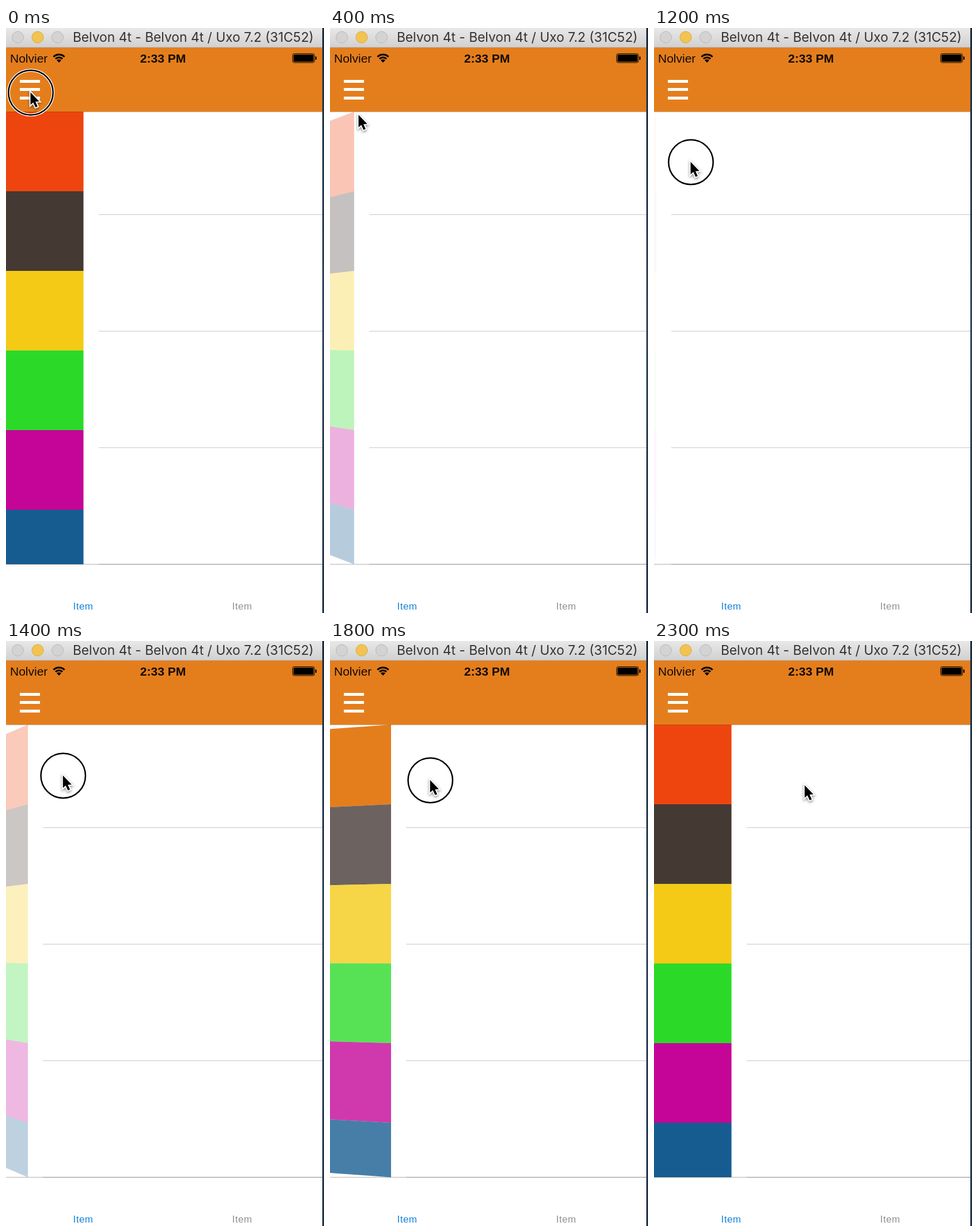
Animation of 552x1014 px, one loop 2400 ms. Source, as an HTML page with a canvas:

```html
<!DOCTYPE html>
<html lang="en">
<head>
<meta charset="utf-8">
<title>Folding drawer</title>
<style>
html, body { margin: 0; width: 100%; height: 100%; overflow: hidden; background: #fff }
canvas { display: block }
</style>
</head>
<body>
<canvas id="stage" width="552" height="1014"></canvas>
<script>
const c = document.getElementById('stage').getContext('2d');
const LOOP = 2400, STEP = 100;
const OPEN = 134.5, TOP = 145, BOTTOM = 929.5, BAND = 138, DEPTH = 1850;
const NAV = '#e47e1d';
const BANDS = ['#ee450f', '#453934', '#f4ca16', '#2bda29', '#c40597', '#165c91'];
const UI = '"Liberation Sans", Arial, sans-serif';

// Pointer path: time, x, y
const PATH = [
  [0, 43, 112], [100, 43, 112], [300, 52, 124], [500, 48, 178], [700, 41, 225],
  [1000, 45, 232], [1200, 64, 232.5], [1600, 134.5, 234.5], [1800, 174.2, 241.5],
  [2000, 222, 247], [2200, 257, 250], [2300, 262, 250.5], [2400, 262, 250.5]
];

function pointerAt(t) {
  const i = PATH.findIndex(p => p[0] > t);
  const [t0, x0, y0] = PATH[i - 1], [t1, x1, y1] = PATH[i];
  const k = (t - t0) / (t1 - t0);
  return [x0 + (x1 - x0) * k, y0 + (y1 - y0) * k];
}

// What remains of a unit step after s seconds of a damped spring
function spring(s) {
  if (s <= 0) return 1;
  const w = 8.95, z = 0.77, q = Math.sqrt(1 - z * z), a = w * q * s;
  return Math.exp(-z * w * s) * (Math.cos(a) + z / q * Math.sin(a));
}

// Springs shut after the tap, then is dragged open at a steady speed
function drawerWidth(t) {
  if (t < 1100) return OPEN * spring((t - 177) / 1000);
  return Math.max(0, Math.min(OPEN, 4 + 0.17 * (t - 1200)));
}

function rect(x, y, w, h, fill) {
  c.fillStyle = fill;
  c.fillRect(x, y, w, h);
}

function poly(points, fill) {
  c.beginPath();
  points.forEach(p => c.lineTo(...p));
  c.closePath();
  c.fillStyle = fill;
  c.fill();
}

function circle(x, y, r, stroke, width, fill) {
  c.beginPath();
  c.arc(x, y, r, 0, 7);
  if (fill) { c.fillStyle = fill; c.fill(); }
  c.strokeStyle = stroke;
  c.lineWidth = width;
  c.stroke();
}

function text(s, x, y, font, fill, align = 'center', spacing = 0) {
  c.font = font;
  c.letterSpacing = spacing + 'px';
  c.textAlign = align;
  c.fillStyle = fill;
  c.fillText(s, x, y);
}

function gradient(y, colors) {
  const g = c.createLinearGradient(0, 0, 0, y);
  colors.forEach((v, i) => g.addColorStop(i / (colors.length - 1), v));
  return g;
}

function drawDrawer(x) {
  if (x <= 0) return;
  const open = Math.min(1, x / OPEN);
  const z = x * Math.tan((1 - open) * Math.PI / 2);
  const scale = DEPTH / (DEPTH + z), mid = (TOP + BOTTOM) / 2;
  const far = y => mid + (y - mid) * scale;
  BANDS.forEach((color, i) => {
    const y0 = TOP + BAND * i, y1 = Math.min(y0 + BAND, BOTTOM);
    // The first band takes the bar colour midway through the fold
    const tinted = i === 0 && open > 0.6 && open < 0.93;
    c.globalAlpha = tinted ? 1 : open;
    poly([[0, far(y0)], [x, y0], [x, y1], [0, far(y1)]], tinted ? NAV : color);
  });
  c.globalAlpha = 1;
}

function drawBars() {
  rect(0, 0, 549, 34, gradient(34, ['#e8e8e8', '#d0d0d0']));
  rect(0, 33, 549, 1, '#b5b1ae');
  circle(20.5, 16, 10, '#b9b9b9', 1, '#d3d3d3');
  circle(55, 16, 10, '#d9a940', 1, '#f3c351');
  circle(89.5, 16, 10, '#b9b9b9', 1, '#d3d3d3');
  text('Belvon 4t - Belvon 4t / Uxo 7.2 (31C52)', 325, 24,
    '22.8px Inter, "Open Sans", sans-serif', '#343434');

  rect(0, 34, 549, 111, NAV);
  rect(0, 145, 549, 1, 'rgba(90,45,0,.3)');
  for (const y of [90, 104, 119]) rect(24, y, 35, 5, '#fff');
  text('Nolvier', 7, 59.5, '21px ' + UI, '#120a02', 'left');
  text('2:33 PM', 272.5, 59.5, 'bold 21px ' + UI, '#120a02');

  c.strokeStyle = '#000';
  c.lineWidth = 3;
  for (const r of [13.5, 8.5]) {
    c.beginPath();
    c.arc(92, 59.5, r, -Math.PI * 0.75, -Math.PI * 0.25);
    c.stroke();
  }
  poly([[92, 60], [88, 55.7], [90, 54.6], [94, 54.6], [96, 55.7]], '#000');

  c.beginPath();
  c.roundRect(497.5, 44.5, 38, 15.5, 3);
  c.lineWidth = 1;
  c.stroke();
  c.beginPath();
  c.roundRect(499, 46, 35, 12.5, 1.5);
  c.fillStyle = '#000';
  c.fill();
  rect(537, 49.5, 2, 5.5, '#000');
}

function drawPointer(x, y, pressed) {
  if (pressed) {
    circle(x, y, 38.7, '#fff', 5);
    circle(x, y, 38.7, '#000', 2.5);
  }
  c.save();
  c.translate(x - 0.5, y - 0.5);
  c.scale(0.95, 0.95);
  c.beginPath();
  [[0, 0], [0, 23], [5, 18.4], [9.2, 27.4], [13, 25.7], [9, 17], [16, 16.5]]
    .forEach(p => c.lineTo(...p));
  c.closePath();
  c.shadowColor = 'rgba(0,0,0,.45)';
  c.shadowBlur = 4;
  c.shadowOffsetY = 2;
  c.strokeStyle = '#fff';
  c.lineWidth = 4;
  c.stroke();
  c.shadowColor = 'transparent';
  c.fillStyle = '#000';
  c.fill();
  c.restore();
}

function draw(t) {
  const [px, py] = pointerAt(t), x = drawerWidth(t);
  rect(0, 0, 552, 1014, '#fff');
  drawDrawer(x);
  for (let y = 323; y < 930; y += 202) rect(Math.round(x + 26), y, 549, 1, '#c8c7cc');
  rect(0, 929, 549, 1, 'rgba(0,0,0,.3)');
  text('Item', 134, 1008, '17px ' + UI, '#1583dc', 'center', 0.5);
  text('Item', 410, 1008, '17px ' + UI, '#929292', 'center', 0.5);
  drawBars();
  rect(549, 0, 3, 1014, gradient(1014, ['#1d2c40', '#34485f', '#22344a']));
  drawPointer(px, py, t < 200 || (t >= 1100 && t < 2000));
}

function tick() {
  const t = (performance.now() + 5) % LOOP;
  draw(Math.floor(t / STEP) * STEP);
  requestAnimationFrame(tick);
}
tick();
</script>
</body>
</html>
```
